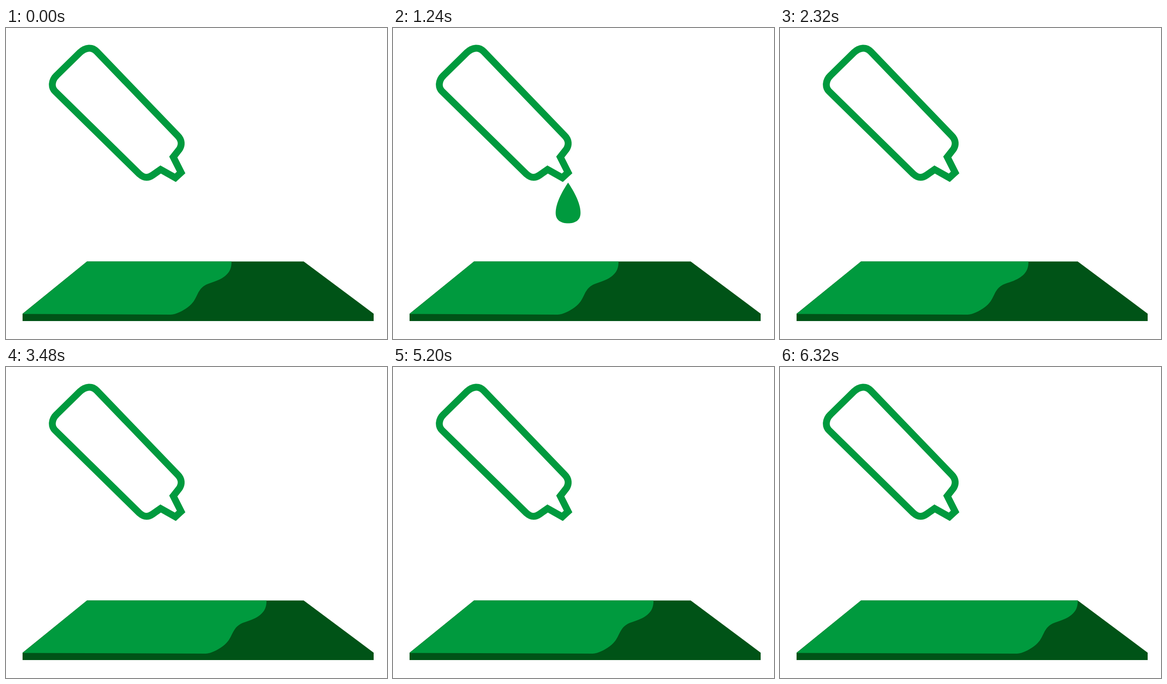
Write an HTML page that moves like this. It is 828 px wide and 676 px high and loops after 7.4 s.

```html
<!DOCTYPE html>
<html lang="en">
<head>
<meta charset="utf-8">
<title>Bottle and board</title>
<style>
  html, body { margin: 0; width: 100%; height: 100%; overflow: hidden; background: #fff; }
  svg { display: block; width: 100%; height: 100%; }
</style>
</head>
<body>
<svg viewBox="0 0 828 676">
  <path fill="#005317" d="M176 507.5H647L799 621V637H36V621Z"/>
  <path id="liquid" fill="#009a3e"/>
  <path fill="none" stroke="#009a3e" stroke-width="15" stroke-miterlimit="10"
    d="M110 103L161 53C173 42 187 40.5 197 51L373 234C382 243 383 254 376.5 264L363.5 280.5
       L380.5 314L368 325.5L336 307.5L319 319.5C309 326.5 300 326.5 290 317.5
       L106.5 137.5C98 129 98.5 114 110 103Z"/>
  <path id="drop" fill="#009a3e"
    d="M0 0C12 18 27 44 27 66C27 83 14 88.5 0 88.5C-14 88.5 -27 83 -27 66C-27 44 -12 18 0 0Z"/>
</svg>
<script>
  const LOOP = 7400, STEP = 40;
  const GROW = 920, FALL = 680, SPREAD = 1060;
  const GRAVITY = 0.000414;
  const TIP = { x: 380.5, y: 320.5 };

  // Each round: when the drop grows, falls and spreads, and how far the liquid moves.
  const rounds = [
    { grow: -40, fall: 1046, spread: 1700, shift: 76 },
    { grow: 3400, fall: 4527, spread: 5240, shift: 81 }
  ];

  const drop = document.getElementById("drop");
  const liquid = document.getElementById("liquid");

  const clamp = v => Math.min(1, Math.max(0, v));
  const ease = p => p < 0.5 ? 2 * p * p : 1 - 2 * (1 - p) * (1 - p);
  const progress = (t, start, length) => ease(clamp((t - start) / length));

  function liquidPath(dx) {
    const edge = `C491 530 478 544 445 554C429 559 423 565 416 579
      C410 591 407 598 395 607C384 615 370 622.5 358 623`;
    const moved = edge.replace(/([\d.]+) ([\d.]+)/g, (_, x, y) => `${+x + dx} ${y}`);
    return `M36 621.5L176 507.5H${490 + dx}${moved}Z`;
  }

  function render(t) {
    let dx = 0, scale = 0, dy = 0;
    for (const r of rounds) {
      dx += r.shift * progress(t, r.spread, SPREAD);
      if (t > r.grow && t < r.fall + FALL) {
        const age = Math.max(0, t - r.fall);
        scale = progress(t, r.grow, GROW);
        dy = GRAVITY * age * age;
      }
    }
    liquid.setAttribute("d", liquidPath(dx));
    drop.setAttribute("transform", `translate(${TIP.x} ${TIP.y + dy}) scale(${scale})`);
  }

  const begin = performance.now();
  function tick() {
    const t = (performance.now() - begin) % LOOP;
    render(Math.floor(t / STEP) * STEP);
    requestAnimationFrame(tick);
  }
  tick();
</script>
</body>
</html>
```
